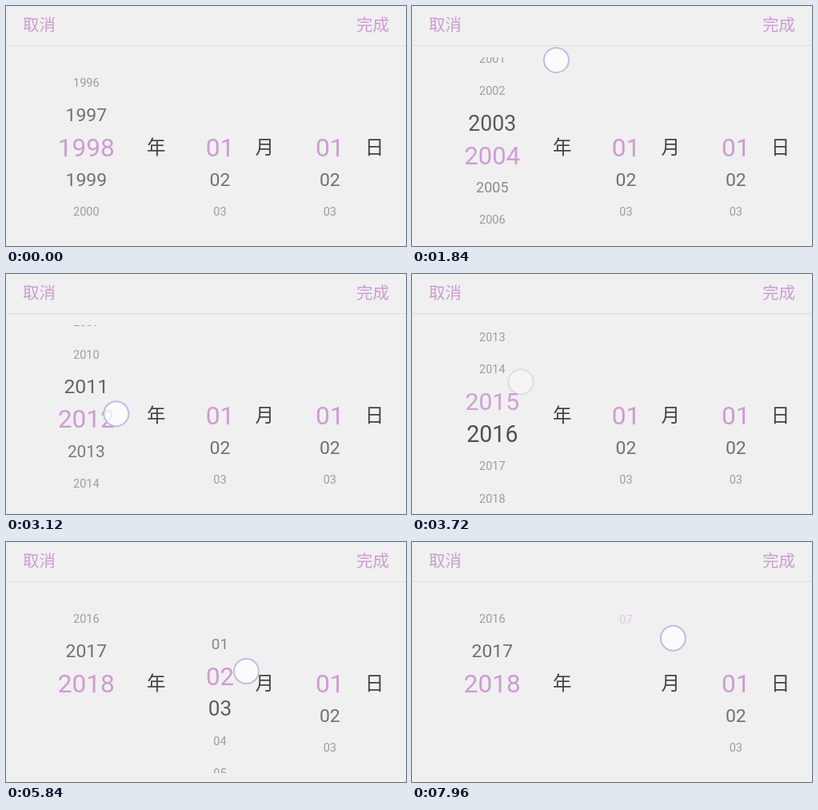
Recreate the animation shown at these times as an HTML page with a canvas. Size 500 by 300 pixels, loop 8 s.

```html
<!DOCTYPE html>
<html lang="zh">
<head>
<meta charset="utf-8">
<title>Date picker</title>
<style>
  html, body { margin: 0; width: 100%; height: 100%; overflow: hidden; background: #f0f0f0; }
  canvas { display: block; }
</style>
</head>
<body>
<canvas width="500" height="300"></canvas>
<script>
const ctx = document.querySelector('canvas').getContext('2d');
const LOOP = 8000, STEP = 40;
const ROW = 40.3, MID = 176.3, CLIP_TOP = 64, CLIP_BOTTOM = 289;
const MIN_SIZE = 14.5, MAX_SIZE = 31.6, FALLOFF = 56.6;
const SNAP_SPEED = 0.2; // px per ms
const FADE = 30;
const PURPLE = '207,154,211', GREY = '64,64,64';

const clamp = (v, lo, hi) => Math.min(hi, Math.max(lo, v));
const mix = (a, b, u) => a + (b - a) * u;

const drag = (start, length, travel, x) => ({ start, length, travel, x });

// Quick year flicks follow a steady beat.
const flicks = [146, 120, 120, 59, 120, 100].map((travel, beat) =>
  drag(2170 + 420 * beat, 280, travel, 128));

const columns = [
  { x: 100.3, first: 1990, last: 2018, value: 1998,
    drags: [drag(40, 1040, 80, 128), drag(1480, 360, 151, 128), ...flicks] },
  { x: 267.5, first: 1, last: 7, value: 1,
    drags: [drag(5180, 1320, 120, 287), drag(6870, 450, 118, 287), drag(7700, 260, 79, 312)] },
  { x: 404.8, first: 1, last: 31, value: 1, drags: [] }
];

function nearest(column, position) {
  return clamp(Math.round(position), column.first, column.last);
}

// Longer drags start lower and bend further to the right.
function fingerAt({ travel, x }, u) {
  return {
    x: x + 0.0023 * travel ** 2 * u,
    y: 213 - 0.27 * (130 - travel) - travel * u
  };
}

// Follow the finger while it is down, then settle on the nearest row.
function columnState(column, time) {
  let position = column.value, touch = null;
  column.drags.forEach((d, i) => {
    if (time < d.start) return;
    const u = clamp((time - d.start) / d.length, 0, 1) ** 1.3;
    const next = column.drags[i + 1];
    const until = next ? Math.min(time, next.start) : time;
    const age = Math.max(0, until - d.start - d.length);
    position += d.travel * u / ROW;
    const reach = age * SNAP_SPEED / ROW;
    position += clamp(nearest(column, position) - position, -reach, reach);
    touch = { ...fingerAt(d, u), alpha: Math.max(0, 1 - age / FADE) ** 2 };
  });
  return { position, touch };
}

function drawText(text, x, baseline, size, family, color) {
  ctx.textAlign = 'center';
  ctx.font = `${size}px ${family}, sans-serif`;
  ctx.fillStyle = color;
  ctx.fillText(text, x, baseline);
}

function drawColumn(column, position) {
  const selected = nearest(column, position);
  for (let i = column.first; i <= column.last; i++) {
    const offset = (i - position) * ROW;
    if (Math.abs(offset) > 125) continue;
    const scale = Math.max(0, 1 - (offset / FALLOFF) ** 2);
    const size = mix(MIN_SIZE, MAX_SIZE, scale);
    const color = `rgba(${i === selected ? PURPLE : GREY},${mix(0.47, 1, scale)})`;
    drawText(String(i).padStart(2, '0'), column.x, MID + offset + size * 0.355, size, 'Roboto', color);
  }
}

function drawTouch({ x, y, alpha }) {
  ctx.globalAlpha = alpha;
  ctx.beginPath();
  ctx.arc(x, y, 15.5, 0, 2 * Math.PI);
  ctx.fillStyle = 'rgba(255,255,255,0.75)';
  ctx.fill();
  ctx.strokeStyle = '#b9c0e2';
  ctx.lineWidth = 2;
  ctx.stroke();
  ctx.globalAlpha = 1;
}

function label(text, x, baseline, size, color) {
  drawText(text, x, baseline, size, '"Noto Sans CJK SC", "Noto Sans CJK"', `rgb(${color})`);
}

function draw(time) {
  ctx.fillStyle = '#f0f0f0';
  ctx.fillRect(0, 0, 500, 300);
  ctx.fillStyle = '#dcdcdc';
  ctx.fillRect(0, 49, 500, 1);
  label('取消', 41.5, 30.5, 20.5, PURPLE);
  label('完成', 458.5, 30.5, 20.5, PURPLE);
  label('年', 187.8, 185, 23.5, GREY);
  label('月', 323.2, 185, 23.5, GREY);
  label('日', 460.5, 185, 23.5, GREY);

  const states = columns.map(column => columnState(column, time));
  ctx.save();
  ctx.beginPath();
  ctx.rect(0, CLIP_TOP, 500, CLIP_BOTTOM - CLIP_TOP);
  ctx.clip();
  columns.forEach((column, i) => drawColumn(column, states[i].position));
  ctx.restore();
  for (const { touch } of states) if (touch && touch.alpha > 0) drawTouch(touch);
}

const origin = performance.now();
function tick() {
  const time = (performance.now() - origin) % LOOP;
  draw(Math.floor(time / STEP) * STEP);
  requestAnimationFrame(tick);
}
tick();
</script>
</body>
</html>
```
